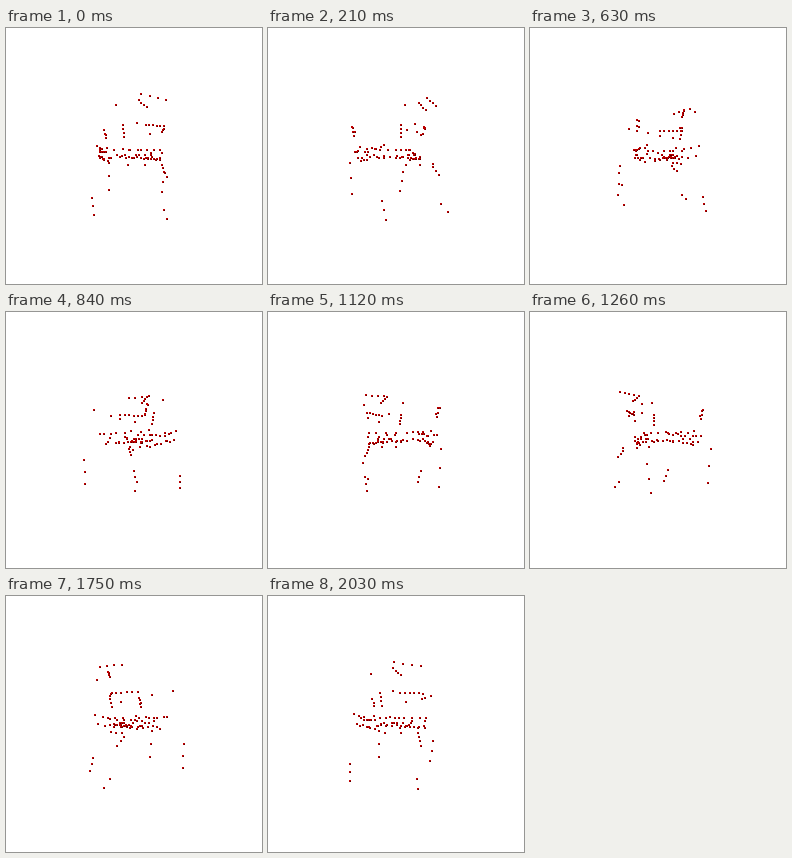
Animation, 256 px wide and 256 px high, one loop 2100 ms. Source, as an HTML page with a canvas:

```html
<!DOCTYPE html>
<html>
<head>
<meta charset="utf-8">
<title>Turning chair</title>
<style>
html, body { margin: 0; width: 100%; height: 100%; overflow: hidden; background: #fff; }
canvas { display: block; }
</style>
</head>
<body>
<canvas id="stage" width="256" height="256"></canvas>
<script>
const ctx = document.getElementById("stage").getContext("2d");
const SIZE = 256, MID = SIZE / 2;
const LOOP = 2100, STEP = 70;
const DIST = MID / Math.tan(Math.PI / 6); // 60 degree field of view

let seed = 7;
function random() {
  seed = seed * 16807 % 2147483647;
  return seed / 2147483647;
}

// Samples an edge of the chair; points are [right, down, toward the viewer].
const chair = [];
function edge(from, to, count, spread = 0) {
  for (let i = 0; i < count; i++) {
    const t = i / (count - 1);
    chair.push(from.map((v, k) => v + (to[k] - v) * t + (random() - 0.5) * spread));
  }
}

function buildLegs() {
  edge([-36, 36, 30], [-34, 50, 34], 3);
  edge([26, 11, 25], [28, 18, 32], 3);
  edge([25, 45, 37], [27, 51, 43], 2);
  edge([-30, 8, -42], [-29, 40, -39], 3);
  edge([35, 19, -34], [32, 42, -35], 3);
}

function buildBack() {
  edge([6, -51, 38], [28, -49, 28], 4);
  edge([4, -48, 30], [11, -42, 31], 4);
  edge([-15, -43, 33], [3, -29, 25], 2);
  edge([10, -27, 30], [28, -28, 12], 6);
  edge([14, -20, 22], [27, -23, 11], 2);
}

function buildArms() {
  edge([-10, -28, 22], [-9, -17, 20], 4);
  edge([29, -26, -2], [33, -30, -23], 2);
  edge([-34, -30, -28], [-32, -21, -28], 5, 2);
}

function buildSeat() {
  edge([-29, -8, -20], [29, -7, -20], 8, 3);   // far rim
  edge([-32, -8, 29], [-33, -4, -28], 9, 4);   // left rim
  edge([-31, 1, 25], [-30, 4, -28], 9, 4);     // left base
  edge([-26, 1, -25], [0, 0, -22], 4, 4);
  edge([-12, 2, 8], [18, 0, 10], 7, 4);
  edge([-10, 1, 17], [15, 0, 17], 6, 3);
  edge([9, 2, 25], [28, 3, -12], 9, 3);        // right base
  edge([-4, -6, 24], [28, -3, -4], 4, 2);
  edge([-5, 8, 23], [25, 8, 26], 3);           // front lip
}

function dot(x, y) {
  ctx.fillStyle = "#b00";
  ctx.fillRect(x - 1, y - 1, 2, 2);
  ctx.fillStyle = "#500";
  ctx.fillRect(x, y, 1, 1);
}

function draw(now) {
  const turn = Math.floor(now % LOOP / STEP) * STEP / LOOP * 2 * Math.PI;
  const c = Math.cos(turn), s = Math.sin(turn);
  ctx.fillStyle = "#fff";
  ctx.fillRect(0, 0, SIZE, SIZE);
  for (const [x, y, z] of chair) {
    const zoom = DIST / (DIST - z * c + x * s);
    dot(Math.round(MID + (x * c + z * s) * zoom), Math.round(MID + y * zoom));
  }
}

function tick(now) {
  draw(now);
  requestAnimationFrame(tick);
}

buildLegs();
buildBack();
buildArms();
buildSeat();
draw(0);
requestAnimationFrame(tick);
</script>
</body>
</html>
```
